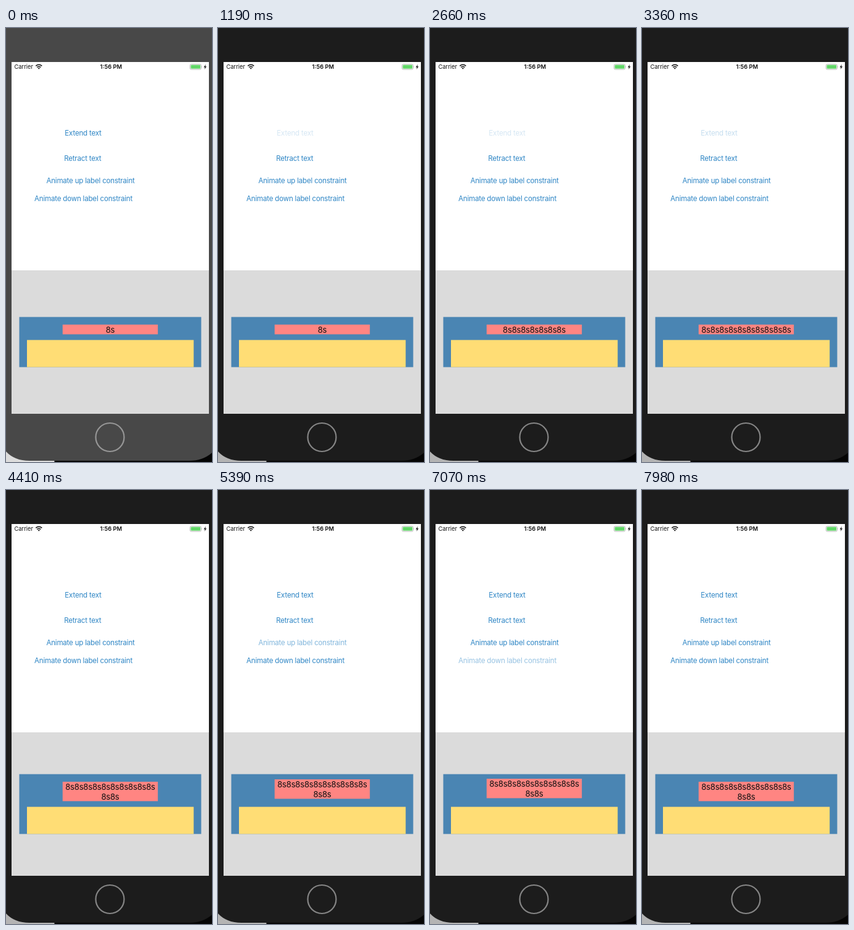
Recreate the animation shown at these times as an HTML page. Size 334 by 702 pixels, loop 8000 ms.

```html
<!DOCTYPE html>
<html lang="en">
<head>
<meta charset="utf-8">
<title>Label constraint demo</title>
<style>
  html, body { margin: 0; width: 100%; height: 100%; overflow: hidden; background: #000; }
  svg { display: block; width: 100%; height: 100%; }
  text { font-family: Inter, Roboto, "Liberation Sans", sans-serif; text-anchor: middle; }
  .button { font-size: 11.6px; letter-spacing: -.22px; fill: #2f86c5; }
  .label { font-size: 13.14px; letter-spacing: -.25px; fill: #111; }
  .status { font-size: 9.3px; fill: #111; }
</style>
</head>
<body>
<svg viewBox="0 0 334 702">
  <rect width="334" height="702" fill="#050505"/>
  <rect id="desk" y="680" width="78.5" height="22"/>
  <path id="body" d="M0 0H334V687Q319 700 297 700H38Q14 700 0 685Z"/>
  <circle id="home" cx="168.5" cy="662" r="23" fill="none" stroke-width="2.2"/>

  <rect x="9" y="55" width="320" height="569" fill="#fff"/>
  <rect x="9" y="392" width="320" height="232" fill="#dbdbdb"/>

  <text class="status" x="28.7" y="66.4">Carrier</text>
  <g fill="none" stroke="#111" stroke-width="1.5">
    <path d="M48.3 61.4Q53.3 57.2 58.3 61.4M50.2 63.6Q53.3 61 56.4 63.6"/>
    <path d="M51.6 64.8Q53.3 63.6 55 64.8L53.3 66.7Z" fill="#111" stroke="none"/>
  </g>
  <text class="status" x="170.3" y="66.4" font-weight="600">1:56 PM</text>
  <rect x="298.4" y="58.6" width="18" height="8.4" rx="2" fill="#fff" stroke="#a5a5a5" stroke-width=".8"/>
  <rect x="299.6" y="59.8" width="15.6" height="6" rx="1" fill="#62d768"/>
  <path d="M317.3 61.3q1.2 1.5 0 3z" fill="#a5a5a5"/>
  <path d="M324 58.8L320.6 63.4H322.7L321.8 67L325.2 62.2H323.1Z" fill="#111"/>

  <text id="extend" class="button" x="125" y="174.4">Extend text</text>
  <text class="button" x="124.3" y="214.7">Retract text</text>
  <text id="up" class="button" x="137" y="251">Animate up label constraint</text>
  <text id="down" class="button" x="125.5" y="280.3">Animate down label constraint</text>

  <rect id="panel" x="21.5" width="295" fill="#4a85b3"/>
  <rect id="footer" x="34" width="270.3" height="43.9" fill="#ffdd75"/>
  <g id="badge">
    <rect id="badgeBox" x="91.8" width="154.4" fill="#ff8582"/>
    <text id="line1" class="label" x="169" y="13.1"></text>
    <text id="line2" class="label" x="169" y="28.8"></text>
  </g>
</svg>
<script>
const LOOP = 8000, STEP = 70, EASE_MS = 460;
const ACTIVE_AT = 1120;
const LINE = 15.7, PER_LINE = 10, SHIFT = 7.7, MIDDLE = 508;

// Press times and how long each press is held, in ms
const taps = {
  extend: { at: Array.from({ length: 11 }, (_, i) => 1120 + 255 * i), hold: 110 },
  up: { at: [5040], hold: 120 },
  down: { at: [6790], hold: 90 }
};

const el = id => document.getElementById(id);
const set = (id, attrs) => {
  for (const name in attrs) el(id).setAttribute(name, attrs[name]);
};
const ease = ms => {
  const x = Math.min(1, Math.max(0, ms / EASE_MS));
  return x * x * (3 - 2 * x);
};

function buttonOpacity({ at, hold }, t) {
  const last = at.filter(time => time <= t).pop();
  return last === undefined ? 1 : 0.2 + 0.8 * ease(t - last - hold);
}

const sinceRelease = ({ at, hold }, t) => t - at[0] - hold;

function draw(t) {
  const active = t >= ACTIVE_AT;
  set('body', { fill: active ? '#1c1c1c' : '#484848' });
  set('home', { stroke: active ? '#858585' : '#969696' });
  set('desk', { fill: active ? '#b4b4b4' : '#dcdcdc' });

  for (const id in taps) set(id, { opacity: buttonOpacity(taps[id], t) });

  const { at, hold } = taps.extend;
  const count = 1 + at.filter(time => time + hold <= t).length;
  const labelHeight = LINE * Math.ceil(count / PER_LINE);
  el('line1').textContent = '8s'.repeat(Math.min(count, PER_LINE));
  el('line2').textContent = '8s'.repeat(Math.max(0, count - PER_LINE));

  const height = 65.4 + labelHeight;
  const top = MIDDLE - height / 2;
  const lift = SHIFT * (ease(sinceRelease(taps.up, t)) - ease(sinceRelease(taps.down, t)));
  set('panel', { y: top, height });
  set('footer', { y: top + height - 43.9 });
  set('badge', { transform: `translate(0 ${top + 12.3 - lift})` });
  set('badgeBox', { height: labelHeight });
}

const start = performance.now();
function tick() {
  const t = (performance.now() - start) % LOOP;
  draw(Math.floor(t / STEP) * STEP);
  requestAnimationFrame(tick);
}
tick();
</script>
</body>
</html>
```
